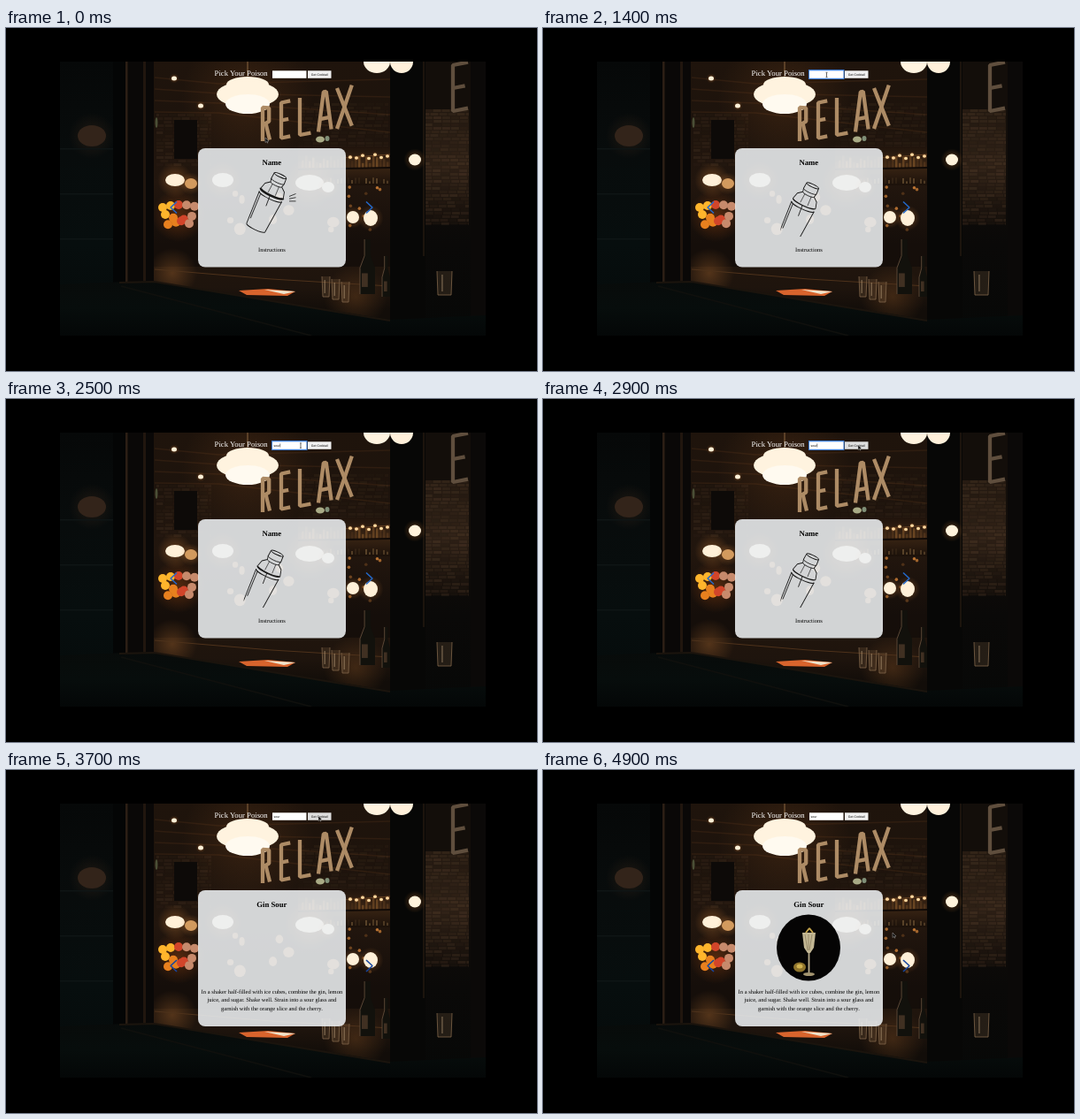
Animation of 600 by 388 pixels, one loop 5000 ms. Source, as an HTML page with a canvas:

```html
<!DOCTYPE html>
<html lang="en">
<head>
<meta charset="utf-8">
<title>Cocktail finder</title>
<style>
html, body { margin: 0; width: 100%; height: 100%; overflow: hidden; background: #000; }
canvas { display: block; }
</style>
</head>
<body>
<canvas id="stage" width="600" height="388"></canvas>
<script>
const W = 600, H = 388, LOOP = 5000, STEP = 100;
const SERIF = '"Liberation Serif", "Times New Roman", serif';
const SANS = '"Liberation Sans", Arial, sans-serif';
const INK = '#171717';
const view = document.getElementById('stage').getContext('2d');
const backdrop = document.createElement('canvas');
backdrop.width = W;
backdrop.height = H;
let g = backdrop.getContext('2d');

let seed = 7;
const rnd = (a = 0, b = 1) => {
  seed = (seed * 16807) % 2147483647;
  return a + (b - a) * seed / 2147483647;
};
const repeat = (n, f) => { for (let i = 0; i < n; i++) f(i); };
const ease = (t, from, to) => {
  const k = Math.min(1, Math.max(0, (t - from) / (to - from)));
  return k * k * (3 - 2 * k);
};

function rect(x, y, w, h, color) {
  g.fillStyle = color;
  g.fillRect(x, y, w, h);
}
function trace(p) {
  g.beginPath();
  for (let i = 0; i < p.length; i += 2) g.lineTo(p[i], p[i + 1]);
}
function poly(color, ...p) {
  trace(p);
  g.fillStyle = color;
  g.fill();
}
function line(color, width, ...p) {
  trace(p);
  g.strokeStyle = color;
  g.lineWidth = width;
  g.lineJoin = 'bevel';
  g.stroke();
}
function oval(x, y, rx, ry, color) {
  g.beginPath();
  g.ellipse(x, y, rx, ry, 0, 0, 7);
  g.fillStyle = color;
  g.fill();
}
function glow(x, y, r, rgb, a) {
  const f = g.createRadialGradient(x, y, 0, x, y, r);
  f.addColorStop(0, `rgba(${rgb},${a})`);
  f.addColorStop(1, `rgba(${rgb},0)`);
  rect(x - r, y - r, 2 * r, 2 * r, f);
}
function bulb(x, y, rx, ry, color = '#fff0d8') {
  glow(x, y, rx * 1.8, '230,140,60', 0.35);
  oval(x, y, rx, ry, color);
}
function fade(y0, y1, ...colors) {
  const f = g.createLinearGradient(0, y0, 0, y1);
  colors.forEach((c, i) => f.addColorStop(i / (colors.length - 1), c));
  return f;
}
function text(s, x, y, font, color = '#000', align = 'center') {
  g.textRendering = 'geometricPrecision';
  g.font = font;
  g.fillStyle = color;
  g.textAlign = align;
  g.fillText(s, x, y);
}
function bricks(x0, y0, x1, y1, alpha) {
  for (let y = y0; y < y1; y += 4) {
    for (let x = x0 + rnd(-6, 0); x < x1; x += 10) {
      const left = Math.max(x, x0);
      rect(left, y, Math.min(x + 9, x1) - left, 3, `rgba(150,110,75,${rnd(0, alpha)})`);
    }
  }
}

function paintRoom() {
  rect(160, 38, 274, 275, fade(38, 313, '#1f140c', '#1d130c', '#22160e', '#150e0a', '#150e09'));
  repeat(4, i => line('#2f1d10', 1.5, 168, 56 + i * 13, 240, 63 + i * 11, 434, 58 + i * 20));
  glow(273, 80, 75, '150,85,35', 0.22);
  bricks(170, 97, 232, 156, 0.12);
  rect(190, 104, 26, 44, '#0d0a08');
  bricks(330, 85, 432, 135, 0.08);

  // bar shelves
  rect(330, 134, 104, 44, fade(134, 178, '#20140c', '#3a2514', '#1b110a'));
  for (let x = 334; x < 432; x += 4) {
    const h = rnd(4, 14);
    rect(x, 158 - h, 2.5, h, `rgba(225,150,70,${rnd(0.05, 0.4)})`);
    rect(x, 176 - h / 2, 2, h / 2, `rgba(240,190,120,${rnd(0, 0.35)})`);
  }
  line('#120b07', 2, 330, 160, 434, 158);
  line('#5c3b20', 1, 380, 147, 434, 143);
  repeat(7, i => bulb(389 + i * 7, 145 + rnd(-2, 3), 2, 1.8, '#ffd9a0'));

  // pendant lamp
  line('#6b4e31', 1.5, 273, 38, 273, 57);
  oval(273, 64, 24, 9, '#fff3df');
  oval(273, 75, 35, 15, '#fff3df');
  oval(273, 86, 25, 11, '#fffaf0');

  bulb(190, 57, 3, 2.5);
  bulb(220, 88, 3, 2.5);
  bulb(191, 172, 11, 7);
  bulb(209, 176, 7, 6, '#d29a5e');
  bulb(245, 172, 12, 8);
  bulb(343, 175, 16, 9);
  bulb(364, 180, 7, 6);
  oval(355, 126, 5, 3.5, '#a9ab86');
  oval(363, 125, 2.5, 3, '#7f8f78');
  oval(170, 107, 1.5, 6, '#4b4f36');

  // street bokeh
  const warm = ['#ffb52c', '#e8801e', '#d2452a', '#c78a6c'];
  glow(195, 212, 30, '255,110,20', 0.25);
  repeat(13, i => oval(177 + i * 3, 212 + 12 * Math.sin(i * 2.2 + 4), 5, 5, warm[Math.min(3, Math.floor(i / 4 + rnd()))]));
  repeat(9, () => oval(rnd(225, 375), rnd(185, 230), rnd(3, 7), rnd(3, 7), '#a67447'));
  repeat(12, () => oval(rnd(386, 428), rnd(180, 240), 1.8, 1.8, `rgba(225,140,60,${rnd(0.2, 0.8)})`));
  bulb(412, 215, 8, 9);
  bulb(392, 214, 7, 7);
}

function glass(x, y, w, h) {
  poly('rgba(150,115,80,.2)', x, y, x + w, y, x + w - 1, y + h, x + 1, y + h);
  line('#80664b', 0.8, x, y, x + 1, y + h, x + w - 1, y + h, x + w, y);
  line('#bba07c', 0.7, x + w * 0.35, y + 4, x + w * 0.35, y + h - 4);
}
function bottle(x, y, w, h) {
  const neck = w * 0.3, a = y + h * 0.3, b = y + h * 0.52;
  poly('#12110c', x + neck, y, x + w - neck, y, x + w - neck, a, x + w, b, x + w, y + h, x, y + h, x, b, x + neck, a);
  line('#6b5540', 0.8, x + neck, y, x + neck, a, x, b, x, y + h);
  rect(x + 2, y + h * 0.62, w * 0.4, h * 0.25, '#403022');
}
function paintCounter() {
  poly(fade(268, 320, '#20150d', '#1e140d', '#120d09'), 160, 270, 434, 270, 434, 332, 160, 288);
  glow(188, 277, 28, '180,110,50', 0.35);
  glow(395, 304, 36, '150,90,40', 0.3);
  line('#4e321b', 1, 168, 273, 300, 284, 434, 292);
  poly('#d8642d', 263, 297, 296, 295, 327, 298, 318, 303, 272, 302);
  poly('#f0e4cc', 292, 296, 327, 298, 314, 301);
  repeat(3, i => glass(357 + i * 11, 281 + i * 3, 9, 23));
  bottle(400, 239, 17, 62);
  bottle(425, 258, 9, 46);
}

// letters in a unit box, each a set of polylines
const GLYPH = {
  R: [[0, 1, 0, 0, 0.9, 0.05, 0.9, 0.45, 0, 0.52], [0.45, 0.5, 1, 1]],
  E: [[1, 0, 0, 0, 0, 1, 1, 1], [0, 0.5, 0.8, 0.5]],
  L: [[0, 0, 0, 1, 1, 1]],
  A: [[0, 1, 0.4, 0, 0.6, 0, 1, 1], [0.2, 0.68, 0.8, 0.68]],
  X: [[0, 0, 1, 1], [1, 0, 0, 1]]
};
function sign(ch, x, y, w, h, color) {
  GLYPH[ch].forEach(p =>
    line(color, 4.3, ...p.map((v, i) => i % 2 ? y + v * h - p[i - 1] * w * 0.2 : x + v * w)));
}

function paintFrame() {
  // left facade and post
  rect(61, 38, 65, 310, fade(38, 348, '#060808', '#080c0c', '#070e0e', '#050a0a'));
  glow(97, 122, 26, '100,65,40', 0.25);
  oval(97, 122, 16, 12, '#33241a');
  repeat(3, i => rect(61, 136 + i * 51, 60, 1.5, '#0f1515'));
  rect(121, 38, 46, 252, '#0a0807');
  rect(121, 38, 14, 252, '#040505');
  rect(135, 38, 2.5, 252, '#2c1f15');
  rect(155, 38, 3, 250, '#21160e');

  // right wall and post
  rect(434, 38, 108, 310, fade(38, 348, '#130e0a', '#130e0a', '#0a0908', '#070807'));
  rect(474, 92, 49, 130, fade(92, 222, '#221810', '#2c1f15', '#140e0a'));
  bricks(474, 92, 523, 222, 0.16);
  rect(434, 38, 40, 310, '#070706');
  rect(471, 38, 2, 220, '#1c140d');
  rect(525, 38, 17, 310, '#0b0908');
  sign('E', 505, 42, 17, 52, '#5f4e3d');
  oval(419, 38, 15, 13, '#fff3df');
  oval(447, 38, 13, 13, '#fff0da');
  rect(404, 24, 58, 14, '#000');
  bulb(462, 149, 7, 6.5, '#fff3dc');
  glass(487, 275, 17, 27);

  // lower sill
  poly(fade(285, 348, '#080b0a', '#070d0c', '#040707'), 61, 290, 160, 286, 434, 330, 542, 325, 542, 348, 61, 348);
  line('#1b140d', 2, 128, 288, 168, 287, 434, 331);
  line('#10100d', 1.5, 130, 292, 345, 348);
}

function paintBackdrop() {
  rect(0, 0, W, H, '#000');
  g.save();
  g.beginPath();
  g.rect(61, 38, 481, 310);
  g.clip();
  paintRoom();
  paintCounter();
  paintFrame();
  [...'RELAX'].forEach((c, i) => sign(c, 290 + 21 * i, 90 - 5.5 * i, 8 + 2.2 * i, 38 + 2 * i, '#ad8b65'));
  g.restore();
}

// elliptic ring across the shaker's axis
function ring(y, r, width, from = 0, to = 2 * Math.PI) {
  g.beginPath();
  g.ellipse(0, y, r, r * 0.22, 0, from, to);
  g.strokeStyle = INK;
  g.lineWidth = width;
  g.stroke();
}
function shaker(t) {
  const phase = (t / 510) % 1;
  const low = ease(Math.min(phase, 1 - phase), 0, 0.16);
  g.save();
  g.beginPath();
  g.rect(268.5, 160, 62, 76);
  g.clip();
  if (low < 0.3) repeat(3, i => line(INK, 0.8, 320, 190.5 + i * 2.7, 327.5, 187.5 + i * 4.2));
  g.translate(310, 167);
  g.rotate(0.44);
  g.translate(0, 12.5 * low);
  // cap, shoulders, rim
  ring(0, 7.5, 0.9);
  ring(7, 8, 0.8, 0, Math.PI);
  ring(11, 7, 0.8, 0, Math.PI);
  for (const s of [-1, 1]) {
    line(INK, 0.9, 7.5 * s, 0, 8 * s, 7, 7 * s, 11, 12 * s, 15, 14 * s, 22);
    line(INK, 0.6, 4 * s, 12, 4.5 * s, 23);
    line(INK, 0.9, 14 * s, 26, 11.5 * s, 65);
  }
  ring(22, 14, 2.4 - 1.2 * low, 0, Math.PI);
  ring(26, 14, 0.9, 0, Math.PI);
  // cup
  line(INK, 0.8, -11.5, 28, -10, 58);
  line(INK, 0.8, -1, 25, 0, 38);
  if (low < 0.8) ring(65, 11.5, 0.9, 0, Math.PI * (1 - low));
  g.restore();
}

function drinkPhoto() {
  oval(300, 201, 36, 37.5, '#050404');
  poly('#c3b794', 293, 184, 308, 184, 306, 201, 302, 207, 299, 207, 295, 201);
  repeat(3, i => line('#877a5b', 0.7, 296 + i * 4, 186, 299 + i, 204));
  line('#b9ac8b', 1.8, 300.5, 207, 300.5, 229);
  oval(300.5, 231, 6.5, 2, '#a49570');
  line('#c6a54c', 2, 297, 184, 301, 179, 305, 184);
  oval(290, 223, 7, 5.5, '#8f742d');
  oval(290, 222, 3.5, 2.5, '#d0b250');
}

const RECIPE = [
  'In a shaker half-filled with ice cubes, combine the gin, lemon',
  'juice, and sugar. Shake well. Strain into a sour glass and',
  'garnish with the orange slice and the cherry.'
];
function card(t) {
  const found = t >= 3500, height = found ? 154 : 134.5;
  g.beginPath();
  g.roundRect(217, 136, 167, height, 8);
  g.fillStyle = 'rgba(236,240,242,.88)';
  g.fill();
  text(found ? 'Gin Sour' : 'Name', 300.3, 154.8, `bold 8.7px ${SERIF}`);
  if (!found) shaker(t);
  else if (t >= 3900) drinkPhoto();
  (found ? RECIPE : ['Instructions']).forEach((s, i) => text(s, 300.4, 252.7 + i * 9.6, `6.5px ${SERIF}`));

  const y = found ? 221.5 : 203;
  for (const s of [-1, 1]) {
    line(found ? '#17469f' : '#2468c8', 1.6, 300 + s * 107, y - 6.5, 300 + s * 114, y, 300 + s * 107, y + 6.5);
  }
}

function header(t) {
  const focus = t >= 900 && t < 3100, hover = t >= 2700 && t < 4000;
  const typed = 'sour'.slice(0, Math.max(0, Math.floor((t - 1400) / 200)));
  text('Pick Your Poison', 235.6, 54, `8.7px ${SERIF}`, '#fff', 'left');
  if (focus) rect(300, 47, 40.5, 11, '#3f7fd8');
  rect(301, 48.3, 38.5, 8.5, '#fff');
  text(typed, 302.5, 53.8, `3.5px ${SANS}`, '#000', 'left');
  if (focus && typed) rect(302.8 + g.measureText(typed).width, 50.5, 0.5, 4, '#000');
  rect(341, 48.3, 26.5, 8.5, hover ? '#dedede' : '#f1f1f1');
  text('Get Cocktail', 354.3, 53.8, `3.5px ${SANS}`);
}

// each move: start, end, x, y
const MOVES = [[0, 600, 320.5, 53], [2300, 2800, 356, 52], [3000, 3400, 353, 52],
  [3900, 4200, 249, 207], [4400, 4900, 395, 184]];
function pointer(t) {
  if (t >= 1600 && t < 2300) return;
  let x = 293, y = 124;
  for (const [from, to, toX, toY] of MOVES) {
    const k = ease(t, from, to);
    x += (toX - x) * k;
    y += (toY - y) * k;
  }
  if (x > 301 && x < 340 && y > 48 && y < 57) {
    line('#222', 0.7, x, y - 2.5, x, y + 2.5);
    for (const s of [-1, 1]) line('#222', 0.6, x - 1, y + 2.7 * s, x + 1, y + 2.7 * s);
  } else {
    const arrow = [x, y, x, y + 5.5, x + 1.4, y + 4.4, x + 2.6, y + 6.3, x + 2.6, y + 4, x + 4, y + 4];
    poly('#111', ...arrow);
    line('#ccc', 0.4, ...arrow, x, y);
  }
}

function draw(now) {
  const t = Math.floor((now % LOOP) / STEP) * STEP;
  g.drawImage(backdrop, 0, 0);
  card(t);
  header(t);
  pointer(t);
}

paintBackdrop();
g = view;
const start = performance.now();
function tick() {
  draw(performance.now() - start);
  requestAnimationFrame(tick);
}
tick();
</script>
</body>
</html>
```
